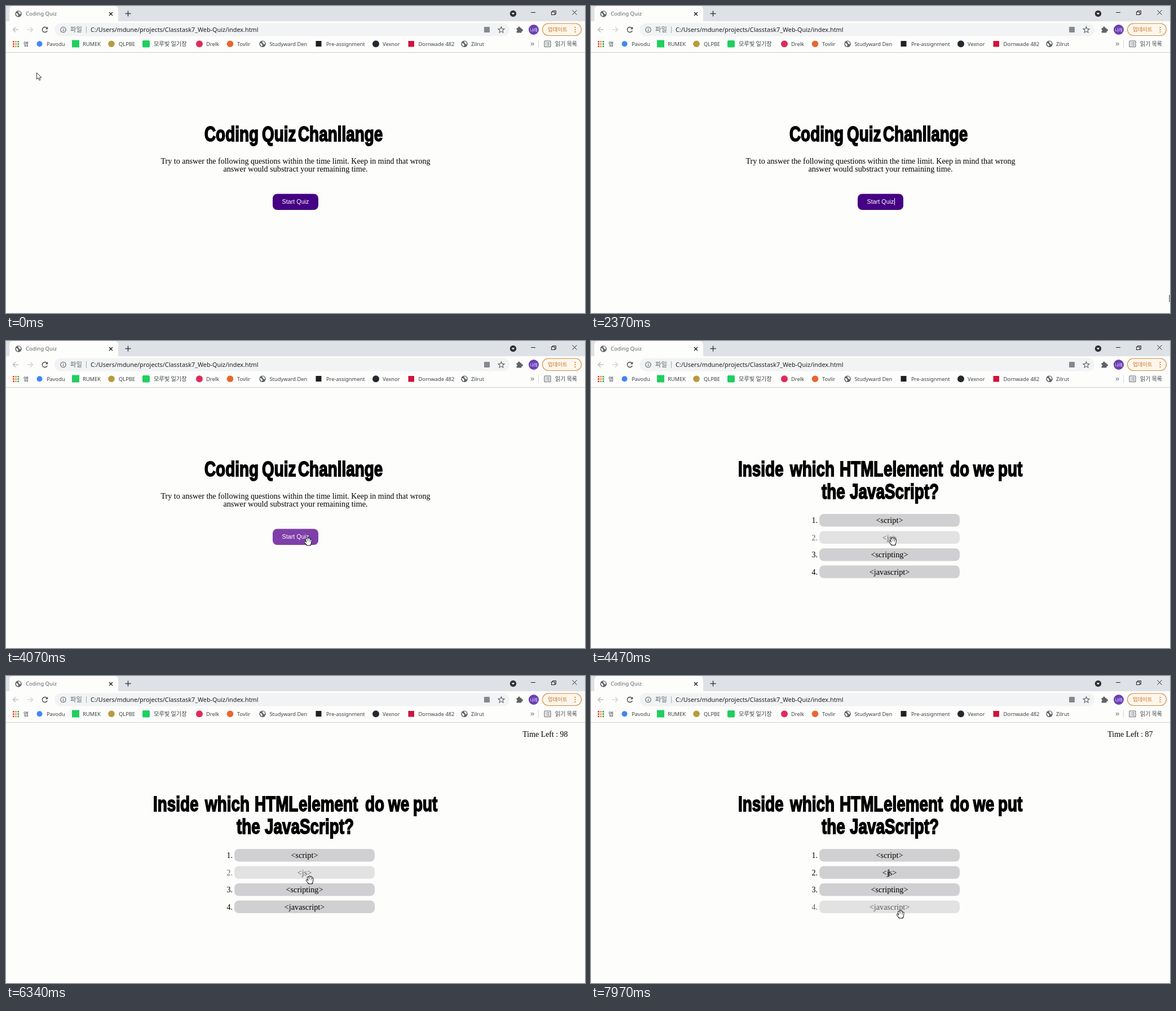
Animation, 1027 px wide and 545 px high, one loop 8000 ms. Source, as an HTML page with a canvas:

```html
<!DOCTYPE html>
<html lang="ko">
<head>
<meta charset="utf-8">
<title>Coding Quiz</title>
<style>
html, body { margin: 0; width: 100%; height: 100%; overflow: hidden; background: #fdfdfc; }
canvas { display: block; width: 1027px; height: 545px; }
</style>
</head>
<body>
<canvas id="stage"></canvas>
<script>
const W = 1027, H = 545, LOOP = 8000;
const START_CLICK = 4320, ANSWER_CLICK = 6850;
const UI = '"Noto Sans", "Noto Sans CJK KR", "Noto Sans CJK", sans-serif';
const KO = '"Noto Sans CJK KR", "Noto Sans CJK", sans-serif';
const SERIF = '"Liberation Serif", serif';
const SANS = '"Liberation Sans", sans-serif';
const PAGE = '#fdfdfc', GREY = '#5f6368', DARK = '#3c4043';

const canvas = document.getElementById('stage');
const ctx = canvas.getContext('2d');
const dpr = window.devicePixelRatio || 1;
canvas.width = W * dpr;
canvas.height = H * dpr;

// Pointer hot spot: time, x, y
const path = [
  [0, 54, 118], [830, 15, 126], [1060, 15, 126], [1670, 18, 127],
  [2370, 1025.5, 513], [2620, 1030, 529], [3300, 600, 374],
  [3650, 535, 350], [4070, 534, 349], [5300, 532, 347],
  [6340, 537, 355], [7490, 538, 355], [7930, 547, 416], [8000, 547, 416]
];
const options = ['<script>', '<js>', '<scripting>', '<javascript>'];

function pointerAt(t) {
  let i = 0;
  while (i < path.length - 2 && t >= path[i + 1][0]) i++;
  const [t0, x0, y0] = path[i], [t1, x1, y1] = path[i + 1];
  const p = (t - t0) / (t1 - t0), e = p * p * (3 - 2 * p);
  return { x: x0 + (x1 - x0) * e, y: y0 + (y1 - y0) * e };
}

function text(str, x, y, font, color, align = 'left') {
  ctx.font = font;
  ctx.fillStyle = color;
  ctx.textAlign = align;
  ctx.fillText(str, x, y);
}

function box(x, y, w, h, r, fill, stroke) {
  ctx.beginPath();
  ctx.roundRect(x, y, w, h, r);
  paint(fill, stroke);
}

function disc(x, y, r, fill, stroke) {
  ctx.beginPath();
  ctx.arc(x, y, r, 0, 7);
  paint(fill, stroke);
}

function paint(fill, stroke) {
  if (fill) { ctx.fillStyle = fill; ctx.fill(); }
  if (stroke) { ctx.strokeStyle = stroke; ctx.stroke(); }
}

function shape(pts, fill) {
  ctx.beginPath();
  for (let i = 0; i < pts.length; i += 2) ctx.lineTo(pts[i], pts[i + 1]);
  ctx.closePath();
  paint(fill);
}

function line(color, width, ...pts) {
  ctx.lineWidth = width;
  ctx.strokeStyle = color;
  ctx.beginPath();
  for (let i = 0; i < pts.length; i += 2) ctx.lineTo(pts[i], pts[i + 1]);
  ctx.stroke();
}

function globe(x, y) {
  disc(x, y, 5.8, GREY);
  shape([x - 5, y - 1.5, x - 2, y - 1, x, y + 1.5, x - 1, y + 4.6, x - 3, y + 3], '#f4f5f6');
  shape([x - 1, y - 4.6, x + 2.5, y - 4.2, x + 4.6, y - 1, x + 3, y + 1.2, x + 0.5, y - 1.5], '#f4f5f6');
}

function star(x, y, r) {
  ctx.beginPath();
  for (let i = 0; i < 10; i++) {
    const a = i * Math.PI / 5 - Math.PI / 2, k = i % 2 ? r * 0.45 : r;
    ctx.lineTo(x + k * Math.cos(a), y + k * Math.sin(a));
  }
  ctx.closePath();
  ctx.lineWidth = 1.1;
  paint(null, GREY);
}

function drawTabs() {
  ctx.fillStyle = '#dee1e6';
  ctx.fillRect(0, 0, W, 27);
  box(6, 0, 193, 30, [6, 6, 0, 0], PAGE);
  globe(22, 14);
  text('Coding Quiz', 35, 17, '9.6px ' + UI, GREY);
  line('#202124', 1.4, 183, 11, 189, 17);
  line('#202124', 1.4, 189, 11, 183, 17);
  line('#3c4043', 1.5, 211.5, 13.5, 221.5, 13.5);
  line('#3c4043', 1.5, 216.5, 8.5, 216.5, 18.5);
  disc(899.5, 13.5, 5.7, '#303236');
  shape([896.8, 12.2, 902.2, 12.2, 899.5, 15.4], '#fff');
  line('#222', 1, 931, 11.5, 939, 11.5);
  line('#222', 1, 969.5, 10, 969.5, 8.5, 975.5, 8.5, 975.5, 14.5, 974, 14.5);
  ctx.strokeRect(967.5, 10.5, 6, 5);
  line('#222', 1, 1004.5, 7.5, 1012.5, 15.5);
  line('#222', 1, 1012.5, 7.5, 1004.5, 15.5);
}

function drawToolbar() {
  line('#b5b8bc', 1.3, 22, 42, 12.5, 42);
  line('#b5b8bc', 1.3, 17, 37.5, 12.5, 42, 17, 46.5);
  line('#cfd1d4', 1.3, 38, 42, 47.5, 42);
  line('#cfd1d4', 1.3, 43, 37.5, 47.5, 42, 43, 46.5);
  ctx.lineWidth = 1.5;
  ctx.beginPath();
  ctx.arc(69, 42, 4.6, 0.4, 5.5);
  paint(null, '#4a4d51');
  shape([74.2, 36.8, 74.2, 41.2, 69.8, 41.2], '#4a4d51');

  box(86, 30.5, 807, 23, 11.5, '#f1f3f4');
  ctx.lineWidth = 1.1;
  disc(101.5, 42, 4.7, null, GREY);
  line(GREY, 1.2, 101.5, 41.4, 101.5, 44.6);
  line(GREY, 1.2, 101.5, 39.2, 101.5, 40.4);
  text('파일', 114, 46, '11.3px ' + KO, GREY);
  line('#a9acb0', 1, 142.5, 36, 142.5, 48);
  text('C:/Users/mdune/projects/Classtask7_Web-Quiz/index.html', 150, 46, '10.85px ' + UI, '#202124');
  box(848, 37, 10, 10, 1, '#85898e');
  star(878.5, 42.5, 5.8);

  box(905.5, 39, 9, 8.5, 1, GREY);
  disc(910, 38.5, 2, GREY);
  disc(915, 43, 2, GREY);
  disc(905.5, 43.3, 1.4, PAGE);
  disc(936, 42, 9, '#6c3fb4');
  text('나래', 936, 44.7, '7px ' + KO, '#fff', 'center');
  ctx.lineWidth = 1.1;
  box(951.5, 31, 69, 21.5, 10.75, '#fdf6ec', '#cf8a3c');
  text('업데이트', 961, 45.4, '9.4px ' + KO, '#c9741e');
  for (const y of [38, 42, 46]) disc(1009.5, y, 1.1, '#c9741e');
}

function drawBookmarks() {
  const font = '9.3px ' + UI, y = 70.5;
  const colors = ['#dc4437', '#e5933a', '#3aa757', '#4285f4'];
  for (let i = 0; i < 9; i++) {
    ctx.fillStyle = colors[(i + (i / 3 | 0)) % 4];
    ctx.fillRect(12 + i % 3 * 4.2, 62 + (i / 3 | 0) * 4.2, 2.7, 2.7);
  }
  disc(59.5, 67.2, 5, '#4285f4');
  box(117, 60.5, 13, 13, 0, '#1fcf5f');
  disc(187, 67.2, 5.8, '#b99a3c');
  box(242, 61, 13, 12.5, 2, '#1fcf5f');
  disc(343, 67.2, 6, '#df2a5c');
  disc(397.5, 67.2, 5.8, '#e8652f');
  globe(455, 67.3);
  box(549.5, 62, 10, 10, 0, '#202020');
  disc(656, 67.2, 6, '#24292e');
  box(713.5, 62, 10.5, 10.5, 0, '#d0143c');
  globe(813, 67.3);
  const labels = [
    ['Pavodu', 72], ['RUMEK', 136], ['QLPBE', 200], ['Drelk', 355], ['Tovlir', 410],
    ['Studyward Den', 467.5], ['Pre-assignment', 568], ['Vexnor', 668],
    ['Dornwade 482', 731.5], ['Zilrut', 825]
  ];
  for (const [s, x] of labels) text(s, x, y, font, DARK);
  text('앱', 31, y, '9.6px ' + KO, DARK);
  text('모루빛 일기장', 262, y, '10.2px ' + KO, DARK);
  for (const x of [931, 934]) line(DARK, 1, x, 65, x + 2.2, 67.5, x, 70);
  line('#d5d7da', 1, 944.5, 60, 944.5, 74);
  ctx.lineWidth = 1.1;
  box(955, 62, 11, 10.5, 1, null, GREY);
  for (const dy of [64.7, 67.2, 69.8]) {
    line(GREY, 1, 957, dy, 958.5, dy);
    line(GREY, 1, 959.5, dy, 964, dy);
  }
  text('읽기 목록', 974, y, '10px ' + KO, DARK);
  line('#cbcdd1', 1, 0, 82.5, W, 82.5);
}

// Heavy condensed headline, one [word, left edge] pair at a time
function headline(words, y) {
  ctx.font = 'bold 36px ' + SANS;
  ctx.textAlign = 'left';
  ctx.fillStyle = ctx.strokeStyle = '#000';
  ctx.lineWidth = 1.8;
  for (const [word, x] of words) {
    ctx.save();
    ctx.translate(x, y);
    ctx.scale(0.774, 1);
    ctx.fillText(word, 0, 0);
    ctx.strokeText(word, 0, 0);
    ctx.restore();
  }
}

const caretOn = t => (t % 1060) >= 100 && (t % 1060) < 630;

function drawIntro(t, p) {
  const hover = p.x > 473 && p.x < 554 && p.y > 333 && p.y < 362;
  headline([['Coding', 352], ['Quiz', 454], ['Chanllange', 518]], 239.5);
  text('Try to answer the following questions within the time limit. Keep in mind that wrong',
    513.5, 279.5, '14.03px ' + SERIF, '#000', 'center');
  text('answer would substract your remaining time.', 513.5, 294, '14.2px ' + SERIF, '#000', 'center');
  box(473, 333.5, 81, 28.5, 8, hover ? '#7f3fa8' : '#450083');
  text('Start Quiz', 513.5, 351, '10.75px ' + SANS, '#fff', 'center');
  if (caretOn(t)) line('#fff', 1, 538.5, 341, 538.5, 353.5);
  return hover;
}

function drawQuestion(t, p) {
  headline([['Inside', 261], ['which', 353], ['HTML', 441], ['element', 519],
    ['do', 637], ['we', 678], ['put', 722]], 239.5);
  headline([['the', 409], ['JavaScript?', 459]], 279.5);
  options.forEach((label, i) => {
    const y = 307 + i * 30.5;
    const hover = p.y > y && p.y < y + 22.5;
    ctx.globalAlpha = hover ? 0.6 : 1;
    box(405, y, 249, 22.5, 8, '#d0d0d2');
    text(label, 529.5, y + 16.3, '14.3px ' + SERIF, '#000', 'center');
    text(i + 1 + '.', 402, y + 16.3, '14px ' + SERIF, '#000', 'right');
    ctx.globalAlpha = 1;
  });
  if (t > ANSWER_CLICK && caretOn(t)) line('#000', 1, 528.5, 343, 528.5, 356.5);

  const ticks = Math.floor((t - START_CLICK) / 1000);
  if (ticks > 0) {
    const left = 100 - ticks - (ticks > 2 ? 10 : 0);
    text('Time Left : ' + left, 996.5, 108.3, '13.9px ' + SERIF, '#000', 'right');
  }
}

function drawArrow(x, y) {
  ctx.save();
  ctx.translate(x, y);
  ctx.lineWidth = 1;
  shape([0.5, 0.5, 0.5, 12, 3.2, 9.6, 5.2, 14, 7, 13.2, 5.2, 9, 9, 9], '#fff');
  paint(null, '#33333b');
  ctx.restore();
}

function drawHand(x, y) {
  ctx.save();
  ctx.translate(x + 2, y + 7);
  ctx.lineCap = ctx.lineJoin = 'round';
  const fingers = (color, w) => {
    line(color, w, -3.3, -4, -1.6, 2);
    line(color, w, -0.6, -5.6, 0, 2);
    line(color, w, 2.1, -4.8, 1.8, 2);
    line(color, w, 4.8, -2.6, 4, 3);
    line(color, w, -5.4, 0.8, -2.2, 4.5);
  };
  const palm = grow => box(-3 - grow, 0.5 - grow, 7.4 + grow * 2, 6 + grow * 2, 2.5, grow ? '#111' : '#fff');
  fingers('#111', 3.7);
  palm(1);
  fingers('#fff', 1.9);
  palm(0);
  ctx.restore();
}

function draw(t) {
  ctx.setTransform(dpr, 0, 0, dpr, 0, 0);
  ctx.fillStyle = PAGE;
  ctx.fillRect(0, 0, W, H);
  drawTabs();
  drawToolbar();
  drawBookmarks();
  const p = pointerAt(t);
  let hand = true;
  if (t < START_CLICK) hand = drawIntro(t, p);
  else drawQuestion(t, p);
  (hand ? drawHand : drawArrow)(p.x, p.y);
}

const began = performance.now();
function frame() {
  draw((performance.now() - began) % LOOP);
  requestAnimationFrame(frame);
}
frame();
</script>
</body>
</html>
```
